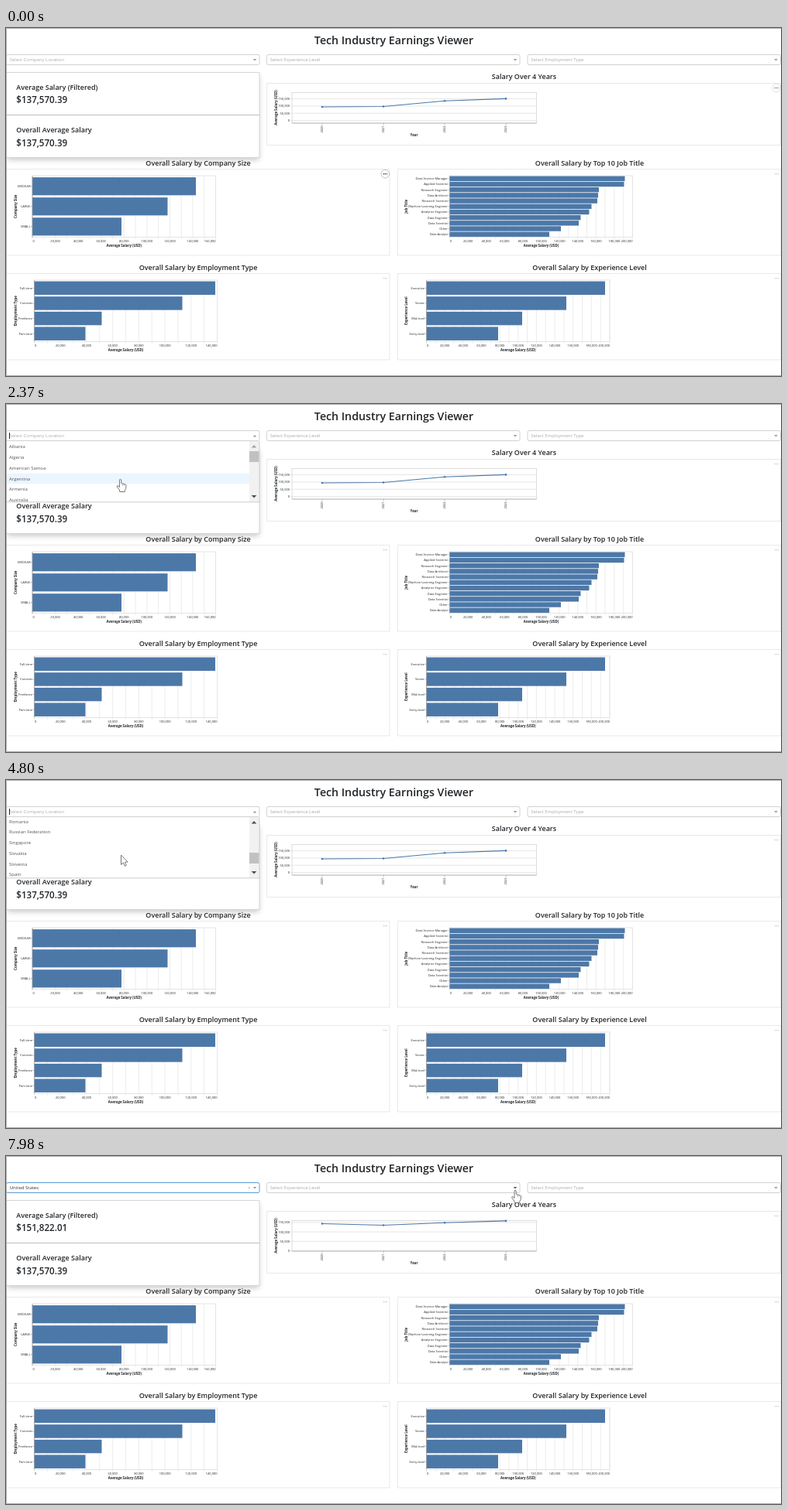
Recreate the animation shown at these times as an HTML page with a canvas. Size 1000x450 px, loop 8000 ms.

```html
<!DOCTYPE html>
<html lang="en">
<head>
<meta charset="utf-8">
<title>Tech Industry Earnings Viewer</title>
<style>
html, body { margin: 0; width: 100%; height: 100%; overflow: hidden; background: #fff; }
canvas { display: block; }
</style>
</head>
<body>
<canvas id="stage" width="1000" height="450"></canvas>
<script>
const LOOP = 8000, OPEN = 1200, CLOSE = 6530, UPDATE = 6900;
const ROW = 13.75, MAX_SCROLL = 884;
const BLUE = '#4c78a8', INK = '#212529', LINE = '#e4e4e4';
const ctx = document.getElementById('stage').getContext('2d');

const countries = ('Albania,Algeria,American Samoa,Argentina,Armenia,Australia,Austria,Bahamas,Belgium,Bolivia,' +
  'Bosnia and Herzegovina,Brazil,Canada,Central African Republic,Chile,China,Colombia,Costa Rica,Croatia,Czechia,' +
  'Denmark,Egypt,Estonia,Finland,France,Germany,Ghana,Greece,Honduras,Hong Kong,Hungary,India,Indonesia,Iran,Iraq,' +
  'Ireland,Israel,Italy,Japan,Kenya,Latvia,Lithuania,Luxembourg,Malaysia,Malta,Mexico,Morocco,Netherlands,' +
  'New Zealand,Nigeria,Pakistan,Philippines,Poland,Portugal,Puerto Rico,Romania,Russian Federation,Singapore,' +
  'Slovakia,Slovenia,Spain,Sweden,Switzerland,Thailand,Türkiye,Ukraine,United Arab Emirates,United Kingdom,' +
  'United States,Viet Nam').split(',');

const barCharts = [
  { title: 'Company Size', x: 34, y: 191, right: 270.5, max: 160, nameX: 12.5, left: 0,
    rows: { MEDIUM: 245, LARGE: 208.5, SMALL: 149 } },
  { title: 'Job Title', heading: 'Top 10 Job Title', x: 572.5, y: 191, right: 808.5, max: 200, nameX: 516.5, left: 505,
    rows: { 'Data Science Manager': 798.5, 'Applied Scientist': 797.5, 'Research Engineer': 765, 'Data Architect': 764,
      'Research Scientist': 763, 'Machine Learning Engineer': 755.5, 'Analytics Engineer': 752.5, 'Data Engineer': 741.5,
      'Data Scientist': 739, 'Other': 716, 'Data Analyst': 701 } },
  { title: 'Employment Type', x: 36.5, y: 326, right: 272.5, max: 140, nameX: 12.5, left: 0,
    rows: { 'Full-time': 270, Contract: 227.5, Freelance: 123.5, 'Part-time': 102.5 } },
  { title: 'Experience Level', x: 542.5, y: 326, right: 779, max: 200, nameX: 516.5, left: 505,
    rows: { Executive: 773, Senior: 723, 'Mid-level': 666, 'Entry-level': 635 } }
];

// Keyframes: [time, ...values]
const pointerKeys = [[360, 352, 100], [580, 318, 47], [740, 318, 47], [900, 317, 44], [1480, 317, 44], [2200, 148.5, 97],
  [5950, 148.5, 97], [6380, 149, 105], [7000, 149, 105], [7900, 658, 44]];
const scrollKeys = [[2720, 0], [2860, 110], [3010, 165], [3220, 330], [3460, 330], [4090, 605], [4230, 605],
  [4800, 758], [5070, 820], [5500, MAX_SCROLL]];
const hoverKeys = [[2200, 3], [2720, -1], [3180, 26], [3460, -1], [5500, 67], [6200, 68], [CLOSE, -1]];

const ease = u => u * u * (3 - 2 * u);

function tween(keys, t) {
  const i = keys.findIndex(k => k[0] > t);
  if (i === 0) return keys[0].slice(1);
  if (i < 0) return keys[keys.length - 1].slice(1);
  const a = keys[i - 1], b = keys[i], u = ease((t - a[0]) / (b[0] - a[0]));
  return a.slice(1).map((v, n) => v + (b[n + 1] - v) * u);
}

const stepAt = (keys, t) => keys.reduce((v, k) => t >= k[0] ? k[1] : v, -1);

function text(s, x, y, size, { weight = 400, color = INK, align = 'left', turn = false } = {}) {
  ctx.save();
  ctx.translate(x, y);
  if (turn) ctx.rotate(-Math.PI / 2);
  ctx.font = `${weight} ${size}px "Open Sans", "Noto Sans", sans-serif`;
  ctx.fillStyle = color;
  ctx.textAlign = align;
  ctx.textBaseline = 'alphabetic';
  ctx.fillText(s, 0, size * 0.36);
  ctx.restore();
}

function box(x, y, w, h, fill, stroke) {
  if (fill) { ctx.fillStyle = fill; ctx.fillRect(x, y, w, h); }
  if (stroke) { ctx.strokeStyle = stroke; ctx.lineWidth = 1; ctx.strokeRect(x, y, w, h); }
}

function path(points, { fill, stroke, width = 1, close = true }) {
  ctx.beginPath();
  points.forEach(p => ctx.lineTo(...p));
  if (close) ctx.closePath();
  if (fill) { ctx.fillStyle = fill; ctx.fill(); }
  if (stroke) { ctx.strokeStyle = stroke; ctx.lineWidth = width; ctx.stroke(); }
}

const line = (x1, y1, x2, y2, stroke = LINE, width = 0.7) =>
  path([[x1, y1], [x2, y2]], { stroke, width, close: false });

// Triangle pointing down for dir 1, up for dir -1
const triangle = (x, y, w, h, dir, fill) =>
  path([[x - w, y - h * dir], [x + w, y - h * dir], [x, y + h * dir]], { fill });

function menuButton(x, y, glow = 0) {
  if (glow) {
    ctx.beginPath();
    ctx.arc(x, y, 5.3, 0, 7);
    ctx.strokeStyle = `rgba(110,110,110,${glow * 0.6})`;
    ctx.lineWidth = 0.7;
    ctx.stroke();
  }
  const shade = 195 - 165 * glow;
  for (const d of [-2, 0, 2]) box(x + d - 0.6, y - 0.6, 1.2, 1.2, `rgb(${shade},${shade},${shade})`);
}

function barChart({ title, heading = title, x, y, right, max, nameX, left, rows }, glow) {
  const h = 79.5, names = Object.keys(rows), step = h / (names.length + 0.05);
  const middle = (x + right) / 2, perTen = (right - x) * 10 / max;
  text('Overall Salary by ' + heading, left + 248, y - 16.5, 9, { weight: 600, align: 'center' });
  box(left + 0.5, y - 8.5, 494.5, 111.5, null, '#e9e9e9');
  menuButton(left + 489.3, y - 2.3, glow);
  box(x, y, right - x, h, null, LINE);
  for (let k = 0; k <= max; k += 10) {
    const gx = x + perTen * k / 10;
    line(gx, y, gx, y + h + 2.5);
    if (k % 20) continue;
    const align = k === 0 ? 'left' : k === max ? 'right' : 'center';
    text(k ? k + ',000' : '0', k ? gx : gx + 0.5, y + 84.5, 4, { align });
  }
  names.forEach((name, i) => {
    const top = y + step * (i + 0.05) + step * 0.03, bar = step * 0.89;
    box(x, top, rows[name] - x, bar, BLUE);
    line(x - 2, top + bar / 2, x, top + bar / 2, '#999');
    text(name, x - 2.5, top + bar / 2, 4, { align: 'right' });
  });
  line(x, y, x, y + h, '#999');
  text('Average Salary (USD)', middle, y + 90, 4.4, { weight: 700, align: 'center' });
  text(title, nameX, y + h / 2, 4.4, { weight: 700, align: 'center', turn: true });
}

function lineChart(filtered, glow) {
  const zero = filtered ? 122.5 : 119.7, step = filtered ? 12.2 : 9.4;
  const values = filtered ? [87.5, 89.5, 86.2, 83.9] : [102, 101.5, 94.3, 91.4];
  text('Salary Over 4 Years', 668.5, 63.2, 9, { weight: 600, align: 'center' });
  box(336.5, 71.5, 663, 80, null, '#e9e9e9');
  menuButton(994, 77.5, glow);
  box(369, 83.5, 315.5, 39.5, null, '#ddd');
  for (let k = 0; k < 4; k++) {
    const y = zero - step * k;
    line(367, y, 684.5, y, '#dcdcdc');
    text(k ? k * 50 + ',000' : '0', 366, y, 4, { align: 'right' });
  }
  line(369, 123, 684.5, 123, '#aaa');
  const points = values.map((y, i) => [408 + 79 * i, y]);
  path(points, { stroke: BLUE, width: 1.1, close: false });
  points.forEach(([x, y], i) => {
    ctx.beginPath();
    ctx.arc(x, y, 1.3, 0, 7);
    ctx.fillStyle = BLUE;
    ctx.fill();
    line(x, 123, x, 125.5, '#aaa');
    text(String(2020 + i), x, 131, 4, { align: 'center', turn: true });
  });
  text('Year', 526.5, 138, 4.4, { weight: 700, align: 'center' });
  text('Average Salary (USD)', 348, 103, 4.4, { weight: 700, align: 'center', turn: true });
}

function select(x, label, { open, focus, value, dark } = {}) {
  ctx.beginPath();
  ctx.roundRect(x + 0.5, 34.5, 326.5, 13, 2);
  ctx.strokeStyle = focus ? '#5a9bd5' : '#d2d2d2';
  ctx.lineWidth = 1;
  ctx.stroke();
  text(value || label, x + 4.7, 41, 6, { color: value ? '#333' : '#aaa' });
  if (value) text('×', x + 313.7, 41, 6, { color: '#999', align: 'center' });
  triangle(x + 321, 41.2, 2.3, 1.3, open ? -1 : 1, dark ? '#555' : '#999');
}

function cards(filtered) {
  ctx.save();
  ctx.shadowColor = 'rgba(0,0,0,.22)';
  ctx.shadowBlur = 7;
  ctx.shadowOffsetY = 3;
  box(0.5, 57.5, 326.5, 110, '#fff');
  ctx.restore();
  box(0.5, 57.5, 326.5, 110, null, '#d6d6d6');
  line(0, 112.5, 327, 112.5, '#bdbdbd', 1);
  const card = (label, amount, y) => {
    text(label, 13.3, y, 9, { weight: 600 });
    text(amount, 13.3, y + 16.8, 11.6, { weight: 600 });
  };
  card('Average Salary (Filtered)', filtered ? '$151,822.01' : '$137,570.39', 76.3);
  card('Overall Average Salary', '$137,570.39', 131.8);
}

function dropdown(t) {
  const [scroll] = tween(scrollKeys, t), hover = stepAt(hoverKeys, t);
  ctx.save();
  ctx.beginPath();
  ctx.rect(0, 48, 327.5, 79);
  ctx.clip();
  box(0, 48, 327.5, 79, '#fff');
  countries.forEach((name, i) => {
    const y = 55.2 + ROW * i - scroll;
    if (y < 38 || y > 137) return;
    if (i === hover) box(1, y - ROW / 2, 313, ROW, '#ebf5ff');
    text(name, 4, y, 6, { color: '#555' });
  });
  box(314, 48, 12.5, 78.5, '#f1f1f1');
  box(314, 61 + 38.5 * scroll / MAX_SCROLL, 12.5, 14, '#c1c1c1');
  triangle(320, 54.8, 3.4, 1.8, -1, scroll > 0 ? '#505050' : '#a3a3a3');
  triangle(320, 119.7, 3.4, 1.8, 1, scroll < MAX_SCROLL ? '#505050' : '#a3a3a3');
  ctx.restore();
  line(0.5, 48, 0.5, 127, '#ccc', 1);
  line(327, 48, 327, 127, '#ccc', 1);
  line(0, 126.8, 327, 126.8, '#ccc', 1);
  if ((t - OPEN) % 1060 < 530) line(4.5, 37, 4.5, 45, '#222', 1);
}

function pointer(x, y, hand) {
  ctx.save();
  ctx.translate(x, y);
  ctx.lineJoin = 'round';
  const paint = { fill: '#fff', stroke: '#777', width: 1 };
  if (hand) {
    path([[-2, 1], [-1, 0], [0.2, 1], [0.2, 5.5], [5.5, 6.8], [6.5, 8], [6.2, 12.5], [4.8, 14.5], [4.8, 16.5],
      [-1.8, 16.5], [-2.2, 14], [-5.5, 9.7], [-5, 8.5], [-3.5, 9], [-2, 10.5]], paint);
    for (const d of [2, 4]) line(d, 6.5, d, 9, '#999');
  } else {
    path([[0, 0], [0, 12.5], [2.8, 9.9], [4.8, 14.4], [6.8, 13.5], [4.9, 9.2], [8.7, 9]], paint);
  }
  ctx.restore();
}

function draw(t) {
  const open = t >= OPEN && t < CLOSE, chosen = t >= CLOSE, filtered = t >= UPDATE;
  const glow = t < 120 ? 1 : Math.max(0, 1 - (t - 120) / 90);
  box(0, 0, 1000, 450, '#fff');
  text('Tech Industry Earnings Viewer', 500.5, 15.5, 14.2, { weight: 600, align: 'center' });
  cards(filtered);
  select(0, 'Select Company Location', { open, focus: chosen, value: chosen && 'United States' });
  select(336, 'Select Experience Level', { dark: t > 7800 });
  select(672.5, 'Select Employment Type');
  lineChart(filtered, glow * 0.5);
  barCharts.forEach((chart, i) => barChart(chart, i ? 0 : glow));
  if (open) dropdown(t);
  path([[1000, 0.5], [0.5, 0.5], [0.5, 449.5], [1000, 449.5]], { stroke: '#b0b0b0', close: false });
  if (t >= 360) pointer(...tween(pointerKeys, t), stepAt(hoverKeys, t) >= 0 || t > 7800);
}

function tick(now) {
  draw(now % LOOP);
  requestAnimationFrame(tick);
}
requestAnimationFrame(tick);
</script>
</body>
</html>
```
